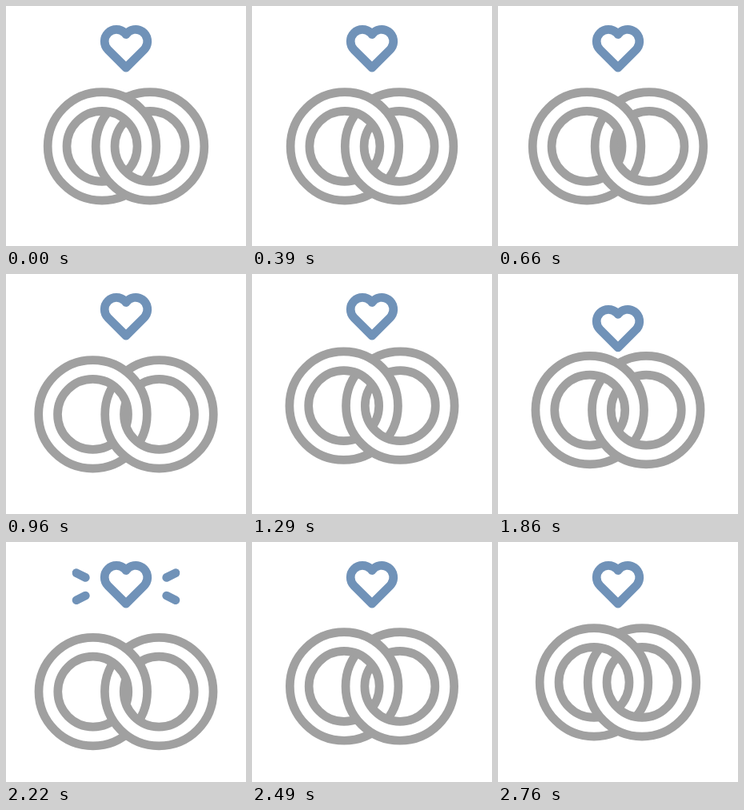
Animation of 300 by 300 pixels, one loop 3.72 s. Source, as an HTML page with a canvas:

```html
<!DOCTYPE html>
<html lang="en">
<head>
<meta charset="utf-8">
<title>Rings and heart</title>
<style>
html, body { margin: 0; width: 100%; height: 100%; overflow: hidden; background: #fff; }
canvas { display: block; width: 300px; height: 300px; }
</style>
</head>
<body>
<canvas id="stage" width="300" height="300"></canvas>
<script>
const ctx = document.getElementById('stage').getContext('2d');
const LOOP = 3720, STEP = 30, LINE = 10.7;
const GRAY = '#a0a0a0', BLUE = '#7092b8';

// Keys are [time, value] pairs, eased in and out between neighbours.
const SPREAD = [[0, 30], [960, 41.5], [1590, 30], [2160, 41.5], [2760, 30]];
const RING_Y = [[960, 175.4], [1590, 155.4], [2160, 187.4], [2760, 175.4]];
const HEART_Y = [[1620, 0], [1850, 15], [2070, -6], [2220, 0]];
const HEAD = [[2100, 0], [2340, 1]];
const TAIL = [[2150, 0], [2430, 1]];

function track(keys, t) {
  if (t <= keys[0][0]) return keys[0][1];
  for (let i = 1; i < keys.length; i++) {
    const [t0, a] = keys[i - 1], [t1, b] = keys[i];
    if (t < t1) return a + (b - a) * (1 - Math.cos(Math.PI * (t - t0) / (t1 - t0))) / 2;
  }
  return keys[keys.length - 1][1];
}

function circle(x, y, r, width, color) {
  ctx.beginPath();
  ctx.arc(x, y, r, 0, Math.PI * 2);
  ctx.lineWidth = width;
  ctx.strokeStyle = color;
  ctx.stroke();
}

function ring(x, y) {
  circle(x, y, 56, 24, '#fff');
  circle(x, y, 67.8, LINE, GRAY);
  circle(x, y, 44, LINE, GRAY);
}

function clippedRing(x, y, top, bottom) {
  ctx.save();
  ctx.beginPath();
  ctx.rect(0, top, 300, bottom - top);
  ctx.clip();
  ring(x, y);
  ctx.restore();
}

// The left ring passes under at the bottom and over at the top.
function rings(half, y) {
  const split = Math.round(y);
  clippedRing(150 - half, y, split, 300);
  ring(150 + half, y);
  clippedRing(150 - half, y, 0, split);
}

function heart(dy) {
  const r = 14.8, gap = 12, y = 44.2 + dy, notch = Math.acos(gap / r);
  ctx.beginPath();
  ctx.moveTo(150, y + r * Math.SQRT2 + gap);
  ctx.arc(150 - gap, y, r, Math.PI * 0.75, Math.PI * 2 - notch);
  ctx.arc(150 + gap, y, r, Math.PI + notch, Math.PI * 2.25);
  ctx.closePath();
  ctx.stroke();
}

function sparks(tail, head) {
  if (head <= tail) return;
  for (const sx of [-1, 1]) for (const sy of [-1, 1]) {
    const point = p => [150 + sx * (46 + 32 * p), 55.7 + sy * (9 + 16 * p)];
    ctx.beginPath();
    ctx.moveTo(...point(tail));
    ctx.lineTo(...point(head));
    ctx.stroke();
  }
}

function draw(t) {
  ctx.fillStyle = '#fff';
  ctx.fillRect(0, 0, 300, 300);
  rings(track(SPREAD, t), track(RING_Y, t));
  ctx.lineWidth = LINE;
  ctx.lineCap = ctx.lineJoin = 'round';
  ctx.strokeStyle = BLUE;
  heart(track(HEART_Y, t));
  sparks(track(TAIL, t), track(HEAD, t));
}

const start = performance.now();
function tick() {
  const t = (performance.now() - start) % LOOP;
  draw(Math.floor(t / STEP) * STEP);
  requestAnimationFrame(tick);
}
tick();
</script>
</body>
</html>
```
